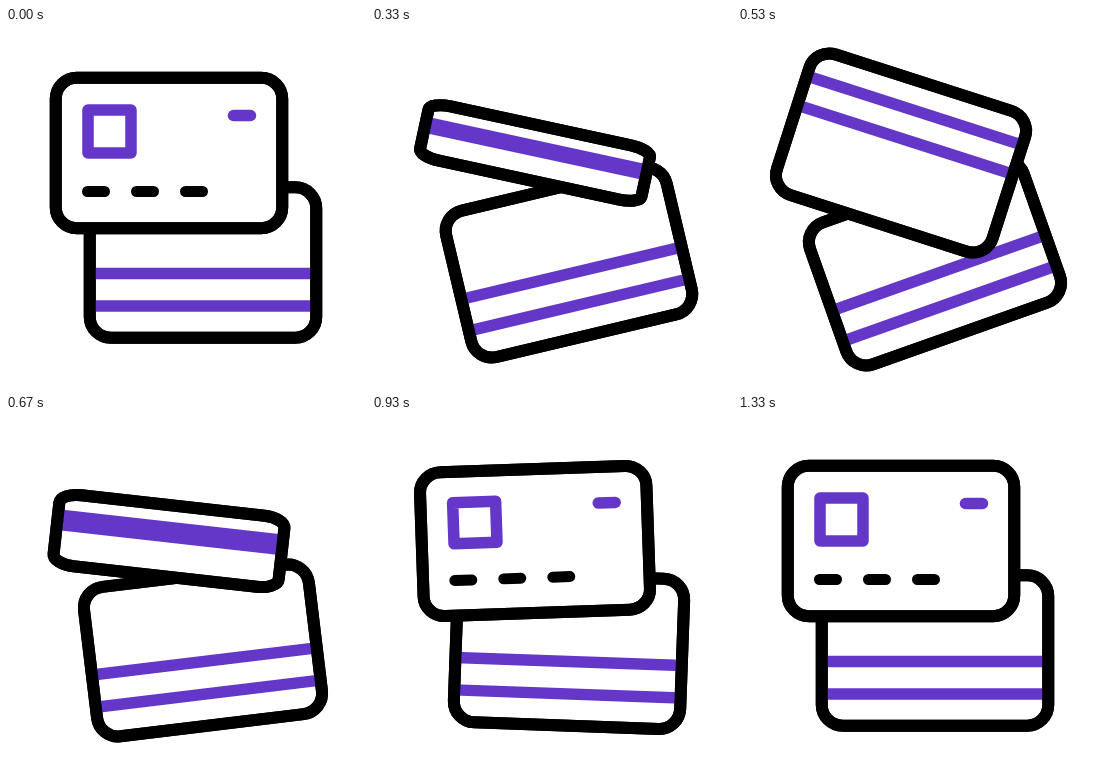
Write an HTML page that moves like this. It is 360 px wide and 360 px high and loops after 2 s.

```html
<!DOCTYPE html>
<html lang="en">
<head>
<meta charset="utf-8">
<title>Card flip</title>
<style>
  html, body { margin: 0; width: 100%; height: 100%; overflow: hidden; background: #fff; }
  svg { display: block; width: 100%; height: 100%; }
  svg * { vector-effect: non-scaling-stroke; }
  .card { fill: #fff; stroke: #000; stroke-width: 12; }
  .edge { fill: none; stroke: #000; stroke-width: 12; }
  .ink { fill: none; stroke: #6437c9; stroke-width: 11.5; }
  .dash { fill: none; stroke: #000; stroke-width: 11; stroke-linecap: round; }
  .round { stroke-linecap: round; stroke-linejoin: round; }
</style>
</head>
<body>
<svg viewBox="0 0 360 360">
  <!-- both cards are drawn around their own centre -->
  <g id="rear">
    <rect class="card" x="-113.25" y="-75.25" width="226.5" height="150.5" rx="21"/>
    <path class="ink" d="M-113 11H113M-113 43.5H113"/>
    <rect class="edge" x="-113.25" y="-75.25" width="226.5" height="150.5" rx="21"/>
  </g>
  <g id="turn">
    <g id="body">
      <rect class="card" x="-113.25" y="-75.25" width="226.5" height="150.5" rx="21"/>
      <g id="face">
        <path class="ink round" d="M-81 -43h43v43h-43z"/>
        <path class="ink round" d="M64.5 -37.5h17"/>
        <path class="dash" d="M-81.5 38.5h17M-32.5 38.5h17M16.5 38.5h17"/>
      </g>
    </g>
    <g id="stripes"><path class="ink" d="M-113 -45.7H113M-113 -14.3H113"/></g>
    <g id="rim">
      <rect class="edge" x="-113.25" y="-75.25" width="226.5" height="150.5" rx="21"/>
    </g>
  </g>
</svg>
<script>
const LOOP = 2000, FPS = 30, THIN = 0.255;
const el = id => document.getElementById(id);
const [rear, turn, body, face, stripes, rim] =
  ["rear", "turn", "body", "face", "stripes", "rim"].map(el);

// keys are [frame, value], eased in and out between neighbours
const rearAngle = [[0, 0], [16, -19.5], [22.5, -0.7], [32, 3.8], [40, 0]];
const frontAngle = [[0, 0], [16, 17.8], [22.5, 0.8], [32, -3.7], [40, 0]];
const open = [[0, 1], [8, 0], [16, 0.975], [22.3, 0], [29, 1]];

function at(keys, f) {
  for (let i = 1; i < keys.length; i++) {
    const [a, from] = keys[i - 1], [b, to] = keys[i];
    if (f <= b) {
      const x = (f - a) / (b - a);
      return from + (to - from) * x * x * (3 - 2 * x);
    }
  }
  return keys[keys.length - 1][1];
}

const set = (node, value) => node.setAttribute("transform", value);
const show = (node, on) => node.setAttribute("display", on ? "inline" : "none");

function draw(ms) {
  const f = Math.floor((ms % LOOP + 4) * FPS / 1000);
  const u = at(open, f);
  const height = `scale(1 ${THIN + (1 - THIN) * u})`;
  const flipped = f >= 8 && f < 22.3;

  set(rear, `translate(197 234.5) rotate(${at(rearAngle, f)})`);
  set(turn, `translate(163 125) rotate(${at(frontAngle, f)})`);
  set(body, height);
  set(rim, height);
  set(stripes, `scale(1 ${Math.max(u, 0.001)})`);
  show(face, !flipped);
  show(stripes, flipped);
}

const start = performance.now();
function tick() {
  draw(performance.now() - start);
  requestAnimationFrame(tick);
}
tick();
</script>
</body>
</html>
```
